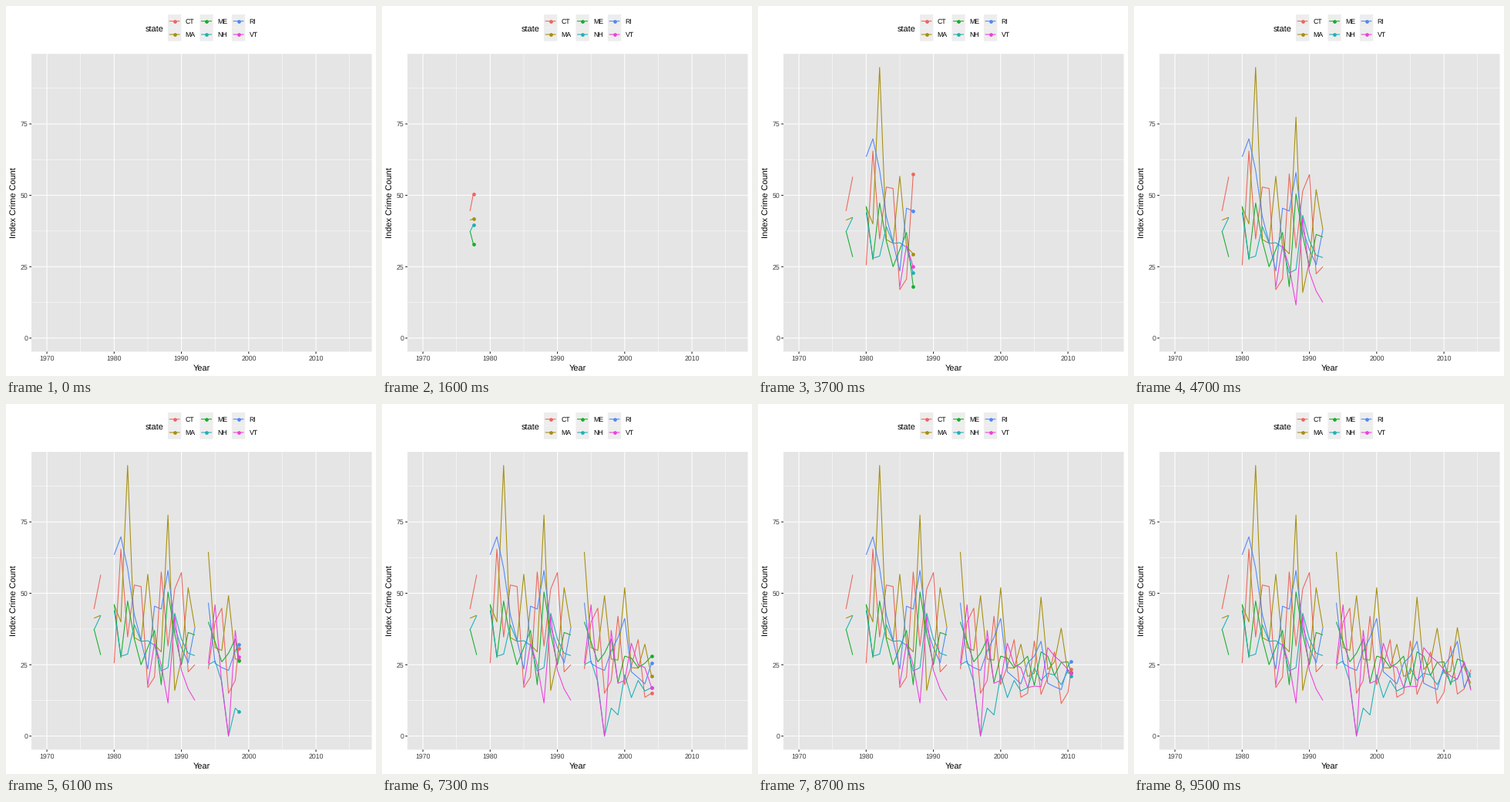
These frames come from a looping animation (480x480 px, 10000 ms). A matplotlib script:

```python
import numpy as np
import matplotlib.pyplot as plt
from matplotlib.animation import FuncAnimation
from matplotlib.patches import Rectangle

plt.rcParams.update({
    "font.family": "Liberation Sans",
    "text.hinting": "none",
    "path.snap": False,
    "path.simplify": False,
})

SIZE, DPI = 480, 72
FRAMES, INTERVAL = 100, 100
FIRST, LAST = 1970, 2016
Y_MAX = 94.8
LEFT, RIGHT, TOP, BOTTOM = 33, 474.5, 62.1, 448.4
LINE_W, DOT = 1.07, 4.7

COLORS = {"CT": "#ee655c", "MA": "#a68e0c", "ME": "#16ae2a",
          "NH": "#1eafb5", "RI": "#4f88f6", "VT": "#f03fdc"}

# Each block holds yearly values that end at its last year.
SEVENTIES = {
    "CT": [44.5, 56.5],
    "MA": [41.3, 42.3],
    "ME": [37.5, 28.4],
    "NH": [37.2, 42.2],
}
EIGHTIES = {
    "CT": [25.5, 65.5, 34.7, 52.9, 52.4, 17, 20.7, 57.5, 31.5, 51.5, 57.3, 22.5, 25],
    "MA": [46, 40, 94.8, 34.5, 33.2, 56.7, 32, 29.5, 77.4, 16, 27, 52, 38],
    "ME": [46.2, 27.5, 47.3, 34, 25, 31, 37, 18, 50.5, 36, 25, 36.3, 35.4],
    "NH": [44, 28, 28.7, 39, 33.2, 33.4, 31.8, 22.8, 24, 43, 34, 29, 28.2],
    "RI": [63.5, 69.8, 58.8, 42.5, 33.5, 23.5, 45.5, 44.5, 58, 38, 31, 25.7, 38],
    "VT": [18, 32.5, 25, 11.6, 42, 23, 16.5, 12.5],
}
LATER = {
    "CT": [23.5, 40, 44.8, 15, 19.5, 42, 18, 24.5, 33.8, 13.6, 15,
           33.3, 14.6, 20.5, 29.5, 11.4, 15.3, 31.5, 14.7, 16.5, 23.3],
    "MA": [64.5, 31, 30, 49.2, 27, 26.6, 52, 24, 23.8, 32.2, 20.9,
           22, 48.7, 23.3, 26, 37.8, 22, 22.7, 38, 24, 18.5],
    "ME": [40, 33, 26, 29, 34, 18.8, 28, 27.3, 24, 25.5, 28,
           17.8, 29.5, 28, 21.3, 25.8, 26, 18, 27, 26, 16.5],
    "NH": [25, 26.3, 19, 0, 9.8, 7.4, 21.5, 13.5, 19.5, 15.8, 17,
           23.8, 19.5, 22, 21.4, 18, 23, 18.8, 20, 25.5, 20.5],
    "RI": [46.7, 25.5, 24, 23, 29.8, 34.5, 41.2, 22.5, 20.5, 18.3, 25.6,
           28, 33.2, 18.5, 17.3, 16.3, 24.5, 28, 33.2, 17, 22],
    "VT": [25.5, 46, 18, 0, 37, 18.5, 19.5, 32.5, 25, 24, 17,
           17.5, 17.3, 31, 28, 26, 23.3, 21, 20, 26, 16],
}
BLOCKS = [(1978, SEVENTIES), (1992, EIGHTIES), (2014, LATER)]


def px(year):
    unit = (RIGHT - LEFT) / 1.1 / (LAST - FIRST)
    return LEFT + (RIGHT - LEFT) / 22 + (np.asarray(year) - FIRST) * unit


def py(value):
    unit = (BOTTOM - TOP) / 1.1 / Y_MAX
    return BOTTOM - (BOTTOM - TOP) / 22 - np.asarray(value) * unit


def frame_of(year):
    """Whole frame on which a year is reached."""
    return np.round((np.asarray(year) - FIRST) * (FRAMES - 1) / (LAST - FIRST))


fig = plt.figure(figsize=(SIZE / DPI, SIZE / DPI), dpi=DPI, facecolor="white")
ax = fig.add_axes([0, 0, 1, 1])
ax.set(xlim=(0, SIZE), ylim=(SIZE, 0))
ax.axis("off")


def box(x, y, w, h, color):
    ax.add_patch(Rectangle((x, y), w, h, fc=color, lw=0, zorder=0))


def line(xs, ys, color, width=LINE_W, z=1):
    return ax.plot(xs, ys, color=color, lw=width, zorder=z,
                   solid_capstyle="butt", solid_joinstyle="round")[0]


def dot(x, y, color, z=4):
    return ax.plot(x, y, "o", color=color, ms=DOT, mew=0, zorder=z)[0]


def label(x, y, text, size=8.8, color="black", **kw):
    ax.text(x, y, text, fontsize=size, color=color,
            **{"va": "baseline", "ha": "left", **kw})


def draw_panel():
    box(LEFT, TOP, RIGHT - LEFT, BOTTOM - TOP, "#e5e5e5")
    for year in range(1970, 2016, 5):
        major = year % 10 == 0
        x = px(year)
        line([x, x], [TOP, BOTTOM], "white", LINE_W if major else LINE_W / 2)
        if major:
            line([x, x], [BOTTOM, BOTTOM + 2.75], "#262626")
            label(x, 459.9, str(year), color="#3c3c3c", ha="center")
    for value in np.arange(0, 90, 12.5):
        major = value % 25 == 0
        y = py(value)
        line([LEFT, RIGHT], [y, y], "white", LINE_W if major else LINE_W / 2)
        if major:
            line([LEFT - 2.75, LEFT], [y, y], "#262626")
            label(LEFT - 4.95, y + 3.2, f"{value:.0f}", color="#3c3c3c", ha="right")
    label((LEFT + RIGHT) / 2, 472.6, "Year", 11, ha="center")
    label(13.4, (TOP + BOTTOM) / 2, "Index Crime Count", 11, rotation=90,
          rotation_mode="anchor", ha="center")


def draw_legend():
    key = 17.28
    label(180.6, 32.6, "state", 11)
    for i, (state, color) in enumerate(COLORS.items()):
        x, y = 209.95 + i // 2 * 41.48, 11 + i % 2 * key
        mid = y + key / 2
        box(x, y, key, key, "#ededed")
        line([x + key * 0.1, x + key * 0.9], [mid, mid], color)
        dot(x + key / 2, mid, color)
        label(x + key + 5.5, mid + 3.2, state)


draw_panel()
draw_legend()

runs = []
for end, block in BLOCKS:
    for i, (state, values) in enumerate(block.items()):
        color = COLORS[state]
        years = np.arange(end - len(values) + 1, end + 1)
        runs.append((years, np.array(values, float),
                     line([], [], color, z=2 + i / 10), dot([], [], color, 4 + i / 10)))


def draw(frame):
    artists = []
    for years, values, path, head in runs:
        keys = frame_of(years)
        x, y = [], []
        if frame >= keys[0]:
            now = np.interp(frame, keys, years)
            past = years < now
            x = px(np.append(years[past], now))
            y = py(np.append(values[past], np.interp(now, years, values)))
        path.set_data(x, y)
        moving = keys[0] <= frame < keys[-1]
        head.set_data(x[-1:] if moving else [], y[-1:] if moving else [])
        artists += [path, head]
    return artists


anim = FuncAnimation(fig, draw, frames=FRAMES, interval=INTERVAL,
                     repeat=True, repeat_delay=0, blit=False)
plt.show()
```
